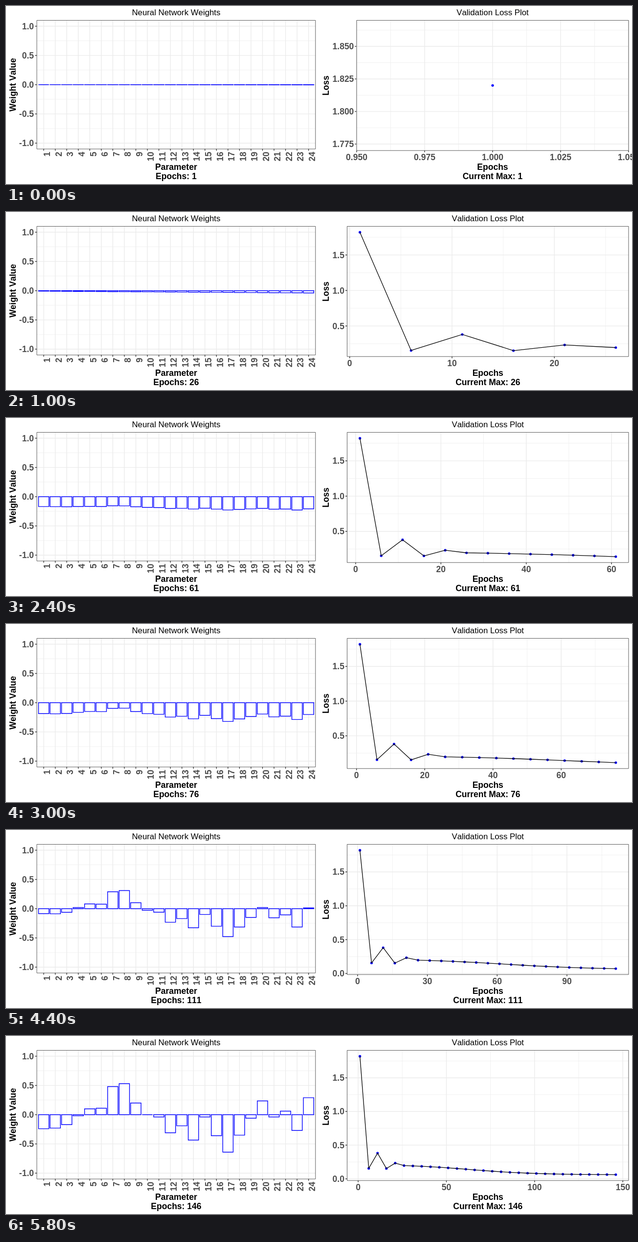
Animation, 1280 px wide and 366 px high, one loop 6 s. Source, as an HTML page:

```html
<!DOCTYPE html>
<html lang="en">
<head>
<meta charset="utf-8">
<title>Training progress</title>
<style>
  html, body { margin: 0; width: 100%; height: 100%; overflow: hidden; background: #fff; }
  svg { display: block; width: 1280px; height: 366px; }
  text { font: bold 17.5px "Liberation Sans", Arial, sans-serif; font-kerning: none; text-anchor: middle; }
  .title { font-weight: normal; font-size: 16.8px; }
  .tick { fill: #4d4d4d; }
  .end { text-anchor: end; }
  path { fill: none; stroke-width: 1.4; }
  .major { stroke: #ebebeb; }
  .minor { stroke: #ebebeb; stroke-width: .7; }
  .mark { stroke: #333; }
  .frame { stroke: #333; stroke-width: .8; }
  .bar { fill: #fff; stroke: #00f; }
  .line { stroke: #000; stroke-width: 1.3; stroke-linejoin: round; }
  circle { fill: #00f; }
</style>
</head>
<body>
<svg id="stage" viewBox="0 0 1280 366"></svg>
<script>
const STEPS = 30, STEP_MS = 200;

// Loss: a short bouncing start, then a logistic decline
const bounce = [1.82, .155, .381, .153, .233];
const lossAt = i => bounce[i] ?? .06 + .155 / (1 + Math.exp((i - 12.5) / 3.8));

// Each weight is a common level, plus a tilt across the row, plus a share of its final value
const goal = [-.24, -.23, -.17, -.02, .1, .11, .48, .53, .2, 0, -.04, -.31,
  -.19, -.435, -.04, -.36, -.64, -.35, -.06, .235, -.04, .06, -.27, .29];
const phases = [
  { at: 0, level: -.002, tilt: -.002, share: 0 },
  { at: 2, level: .015, tilt: -.012, share: 0 },
  { at: 8, level: -.062, tilt: -.019, share: 0 },
  { at: 12, level: -.19, tilt: -.03, share: .04 },
  { at: 18, level: -.208, tilt: -.07, share: .28 },
  { at: 22, level: -.051, tilt: -.11, share: .6 },
  { at: 29, level: 0, tilt: 0, share: 1 }
];
function weights(step) {
  const k = Math.max(1, phases.findIndex(p => p.at >= step));
  const a = phases[k - 1], b = phases[k], u = (step - a.at) / (b.at - a.at);
  const mix = key => a[key] + (b[key] - a[key]) * u;
  const level = mix('level'), tilt = mix('tilt'), share = mix('share');
  return goal.map((g, i) => level + tilt * (2 * i / (goal.length - 1) - 1) + share * g);
}

// Extended Wilkinson tick search, aiming for five labels
function breaks(lo, hi) {
  const Q = [1, 5, 2, 2.5, 4, 3], span = hi - lo, eps = 1e-9;
  let best = { score: -2 };
  for (let j = 1; j <= 3; j++) Q.forEach((q, qi) => {
    for (let n = 2; n <= 10; n++) {
      const z0 = Math.ceil(Math.log10(span / (n + 1) / j / q));
      for (let z = z0; z < z0 + 2; z++) {
        const step = j * q * 10 ** z;
        const last = Math.ceil(lo / step) * j;
        for (let s = (Math.floor(hi / step) - n + 1) * j; s <= last; s++) {
          const a = s * step / j, b = a + step * (n - 1);
          const zero = s % j === 0 && a <= eps && b >= -eps ? 1 : 0;
          const simple = 1 - qi / (Q.length - 1) - j + zero;
          const cover = 1 - .5 * ((hi - b) ** 2 + (lo - a) ** 2) / (.1 * span) ** 2;
          const ratio = (n - 1) / (b - a) * (Math.max(b, hi) - Math.min(a, lo)) / 4;
          const score = .25 * simple + .2 * cover + .5 * (2 - Math.max(ratio, 1 / ratio));
          if (score > best.score + eps) best = { score, a, step, n };
        }
      }
    }
  });
  const { a, step, n } = best;
  const inside = v => v >= lo - eps && v <= hi + eps;
  const grid = Array.from({ length: n + 2 }, (_, i) => a + (i - 1) * step);
  const major = grid.slice(1, -1).filter(inside);
  const minor = grid.slice(0, -1).map(v => v + step / 2).filter(inside);
  const digits = Math.max(...major.map(v => String(+v.toFixed(6)).split('.')[1]?.length || 0));
  return { major, minor, labels: major.map(v => Math.abs(v).toFixed(digits)) };
}

const f = v => +v.toFixed(2);
const path = (cls, d) => `<path class="${cls}" d="${d}"/>`;
const hline = (cls, x1, x2, y) => path(cls, `M${f(x1)} ${f(y)}H${f(x2)}`);
const vline = (cls, x, y1, y2) => path(cls, `M${f(x)} ${f(y1)}V${f(y2)}`);
const box = (cls, x1, y1, x2, y2) => path(cls, `M${f(x1)} ${f(y1)}H${f(x2)}V${f(y2)}H${f(x1)}Z`);
const text = (cls, x, y, s, turn = 0) =>
  `<text class="${cls}" transform="translate(${f(x)} ${f(y)}) rotate(${turn})">${s}</text>`;

function captions(mid, title, name, note) {
  return text('title', mid, 19.3, title) + text('', mid, 337, name) + text('', mid, 356.1, note);
}

function weightPlot(step) {
  const L = 63, R = 632.8, T = 29.5, B = 294, unit = (R - L) / (goal.length + .2);
  const X = i => L + (i + .6) * unit, Y = v => (T + B) / 2 - v * (B - T) / 2.2;
  let s = '';
  for (let v = -.75; v < 1; v += .5) s += hline('minor', L, R, Y(v));
  for (let v = -1; v <= 1; v += .5) {
    s += hline('major', L, R, Y(v)) + hline('mark', L - 3.6, L, Y(v))
      + text('tick end', L - 6, Y(v) + 6.2, v.toFixed(1));
  }
  goal.forEach((_, i) => {
    s += vline('major', X(i), T, B) + vline('mark', X(i), B, B + 3.6)
      + text('tick end', X(i) + 13.2, 299.8, i + 1, -90);
  });
  weights(step).forEach((w, i) => {
    s += box('bar', X(i - .45), Y(0), X(i + .45), Y(w));
  });
  return s + box('frame', L, T, R, B) + text('', 20, 162, 'Weight Value', -90)
    + captions((L + R) / 2, 'Neural Network Weights', 'Parameter', 'Epochs: ' + (1 + 5 * step));
}

function padded(values) {
  const lo = Math.min(...values), hi = Math.max(...values), pad = (hi - lo) * .05 || .05;
  return [lo - pad, hi + pad];
}

function lossPlot(step) {
  const epoch = 1 + 5 * step, seen = Array.from({ length: step + 1 }, (_, i) => lossAt(i));
  const [x0, x1] = padded([1, epoch]), [y0, y1] = padded(seen);
  const bx = breaks(x0, x1), by = breaks(y0, y1);
  const L = 697.5 + (by.labels[0].length - 3) * 9.73, R = 1273, T = 29.5, B = 297.2;
  const X = v => L + (v - x0) / (x1 - x0) * (R - L), Y = v => B - (v - y0) / (y1 - y0) * (B - T);
  let s = '';
  for (const v of by.minor) s += hline('minor', L, R, Y(v));
  for (const v of bx.minor) s += vline('minor', X(v), T, B);
  by.major.forEach((v, i) => {
    s += hline('major', L, R, Y(v)) + hline('mark', L - 3.6, L, Y(v))
      + text('tick end', L - 5.6, Y(v) + 6.2, by.labels[i]);
  });
  bx.major.forEach((v, i) => {
    s += vline('major', X(v), T, B) + vline('mark', X(v), B, B + 3.6)
      + text('tick', X(v), 317.3, bx.labels[i]);
  });
  const dots = seen.map((v, i) => [f(X(1 + 5 * i)), f(Y(v))]);
  for (const [x, y] of dots) s += `<circle cx="${x}" cy="${y}" r="2.6"/>`;
  if (step) s += path('line', 'M' + dots.join('L'));
  return s + box('frame', L, T, R, B) + text('', 660.3, 163.5, 'Loss', -90)
    + captions((L + R) / 2, 'Validation Loss Plot', 'Epochs', 'Current Max: ' + epoch);
}

const stage = document.getElementById('stage');
const start = performance.now();
let shown = -1;
function tick() {
  const step = Math.floor((performance.now() - start) / STEP_MS) % STEPS;
  if (step !== shown) {
    shown = step;
    stage.innerHTML = weightPlot(step) + lossPlot(step);
  }
  requestAnimationFrame(tick);
}
tick();
</script>
</body>
</html>
```
